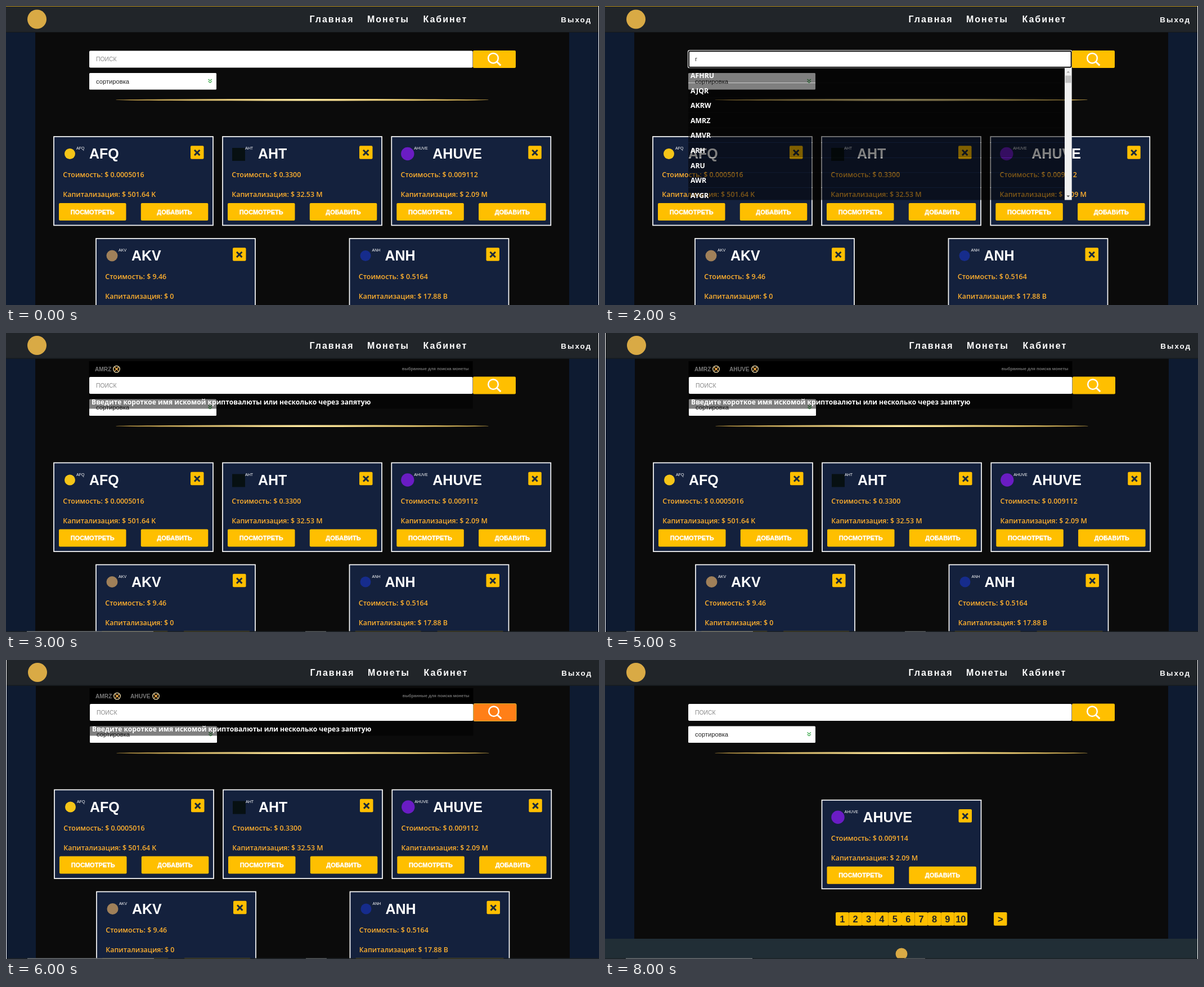
Animation of 1054 by 531 pixels, one loop 9000 ms. Source, as an HTML page:

```html
<!DOCTYPE html>
<html lang="ru">
<head>
<meta charset="utf-8">
<title>Монеты</title>
<style>
  html, body { margin: 0; width: 100%; height: 100%; overflow: hidden; background: #fff; }
  svg { display: block; width: 100%; height: 100%; }
  text { font-family: "Liberation Sans", Arial, sans-serif; white-space: pre; }
  .b { font-weight: 700; }
  .soft { font-family: "Open Sans", "Noto Sans", sans-serif; font-weight: 600; }
  .list { font-family: "Open Sans", "Noto Sans", sans-serif; font-weight: 700; }
  .mid { text-anchor: middle; }
  .end { text-anchor: end; }
</style>
</head>
<body>
<svg id="stage" viewBox="0 0 1054 531" preserveAspectRatio="none">
  <defs>
    <linearGradient id="gold">
      <stop offset="0" stop-color="#b08d3c"/>
      <stop offset=".5" stop-color="#ffeaa0"/>
      <stop offset="1" stop-color="#c9a548"/>
    </linearGradient>
  </defs>
  <g id="page"></g>
</svg>
<script>
const YELLOW = '#ffbf00', INK = '#212529', NAVY = '#14213d';

const rect = (x, y, w, h, fill, rx = 0, extra = '') =>
  `<rect x="${x}" y="${y}" width="${w}" height="${h}" rx="${rx}" fill="${fill}" ${extra}/>`;
const text = (x, y, size, fill, str, cls = '', extra = '') =>
  `<text x="${x}" y="${y}" font-size="${size}" fill="${fill}" class="${cls}" ${extra}>${str}</text>`;
const circle = (x, y, r, fill, extra = '') =>
  `<circle cx="${x}" cy="${y}" r="${r}" fill="${fill}" ${extra}/>`;
const line = (d, color, width) =>
  `<path d="${d}" fill="none" stroke="${color}" stroke-width="${width}"/>`;
const cross = (x, y, r, color, width) =>
  line(`M${x - r} ${y - r}l${2 * r} ${2 * r}m0 ${-2 * r}l${-2 * r} ${2 * r}`, color, width);
const group = (id, body, extra = '') => `<g id="${id}" ${extra}>${body}</g>`;

function button(x, y, label) {
  return rect(x, y, 119.5, 31, YELLOW, 2) +
    text(x + 59.7, y + 19.5, 11, '#fff', label, 'b mid', 'stroke="#fff" stroke-width=".35"');
}

function card(x, y, coin) {
  const icon = coin.square
    ? rect(17, 20, 23, 23, coin.color)
    : circle(28.5, 30.5, coin.r, coin.color);
  return `<g transform="translate(${x} ${y})">` +
    rect(0, 0, 283, 157.5, NAVY, 0, 'stroke="#fff" stroke-width="1.7"') +
    icon +
    text(40, 23, 7.1, '#fff', coin.name) +
    text(coin.name.length > 3 ? 73 : 63, 39, 25, '#fff', coin.name, 'b') +
    rect(243, 16.3, 23.5, 23.5, YELLOW, 2) + cross(254.7, 28.4, 4.7, '#1c2b3c', 3) +
    text(16.3, 72, 12.4, '#ffb02e', 'Стоимость: $ ' + coin.price, 'soft') +
    text(16.3, 107, 12.4, '#ffb02e', 'Капитализация: $ ' + coin.cap, 'soft') +
    button(9, 118, 'ПОСМОТРЕТЬ') + button(154.8, 118, 'ДОБАВИТЬ') + '</g>';
}

function dropRows(names) {
  const pitch = 26.6, top = 110, bottom = 344.5;
  return names.map((name, i) => {
    const y = top + i * pitch;
    return rect(148, y, 669, Math.min(pitch - .6, bottom - y), '#000', 0, 'opacity=".5"') +
      text(152, y + 18, 12.3, '#fff', name, 'list');
  }).join('') +
    rect(817, top, 12.7, bottom - top, '#f1f1f1') +
    rect(818, 123.5, 10.5, 13, '#c1c1c1') +
    '<path d="M820.5 118.5l2.8-3 2.8 3z" fill="#a3a3a3"/>' +
    '<path d="M820.5 336.5l2.8 3 2.8-3z" fill="#505050"/>';
}

function chip(x, iconX, name) {
  return text(x, 69, 10.2, '#777', name, 'b') +
    circle(iconX, 65.6, 5.8, 'none', 'stroke="#f3e3b5" stroke-width="1.3"') +
    cross(iconX, 65.6, 3.2, '#ffb347', 1.5);
}

const coins = [
  { name: 'AFQ', price: '0.0005016', cap: '501.64 K', color: '#f5c518', r: 9.5 },
  { name: 'AHT', price: '0.3300', cap: '32.53 M', color: '#071012', square: true },
  { name: 'AHUVE', price: '0.009112', cap: '2.09 M', color: '#6a1cc4', r: 11.7 },
  { name: 'AKV', price: '9.46', cap: '0', color: '#a08059', r: 10 },
  { name: 'ANH', price: '0.5164', cap: '17.88 B', color: '#162c8c', r: 9.5 }
];
const spots = [[85, 232], [385, 232], [685.3, 232], [160, 413], [610.5, 413]];

const header =
  rect(0, 0, 1053, 47, INK) + rect(0, 0, 1053, 1, '#b8901c') + rect(0, 46, 1053, 1, '#15181b') +
  circle(55, 23.5, 17, '#d9aa45') +
  [[539.5, 'Главная'], [642, 'Монеты'], [741.5, 'Кабинет']]
    .map(([x, s]) => text(x, 29, 16, '#fff', s, 'b', 'letter-spacing="2"')).join('') +
  text(986.3, 29, 13.4, '#fff', 'Выход', 'b', 'letter-spacing="2"');

const search =
  group('plain', rect(148, 79.5, 681.5, 30, '#fff', 2)) +
  group('focus', rect(147, 78.3, 683.5, 32.2, '#fff', 3) +
    rect(149, 80.2, 679.7, 28.6, '#fff', 2, 'stroke="#101010" stroke-width="2"')) +
  text(160, 98.4, 10.4, '#8a8a8a', '', '', 'id="query"') +
  rect(830, 79, 76, 31, YELLOW, 2, 'id="go"') +
  circle(866, 92.7, 8.8, 'none', 'stroke="#fff" stroke-width="2.5"') +
  line('M872.3 99l7 6.6', '#fff', 3);

const select =
  rect(148, 119, 226, 29.5, '#fff', 1.5) +
  text(160, 137.5, 11.2, '#222', 'сортировка') +
  line('M359.5 130l3.2 2.8 3.2-2.8m-6.4 3.5l3.2 2.8 3.2-2.8', '#3aa84a', 1.2) +
  '<ellipse cx="526.5" cy="166.7" rx="331.5" ry="1.8" fill="url(#gold)"/>';

const hint =
  rect(148, 110, 681.7, 26, '#000', 0, 'opacity=".5"') +
  text(152, 128, 12.1, '#fff',
    'Введите короткое имя искомой криптовалюты или несколько через запятую', 'list');

const picked =
  rect(147.5, 51.5, 682, 28, '#000') +
  chip(158, 196.5, 'AMRZ') + group('chip2', chip(220, 265.5, 'AHUVE')) +
  text(822.5, 67.8, 7.5, '#6e6e6e', 'выбранные для поиска монеты', 'b end');

const loader =
  rect(100, 177, 853, 356, '#111') +
  [224, 397.5].map(y => [132.7, 401.3, 670.3]
    .map(x => rect(x, y, 250, 148.5, '#282828', 4)).join('')).join('') +
  rect(479.3, 337, 14.8, 68, '#ffb347') +
  rect(518.8, 335, 14.6, 72, '#3db549') +
  rect(558, 330, 15, 82, '#adc6df');

const pageTab = (x, s) =>
  rect(x, 449.6, 23.5, 23.6, YELLOW, 2) + text(x + 11.7, 467.4, 16.4, INK, s, 'b mid');
const found =
  card(385.5, 250.3, { ...coins[2], price: '0.009114' }) +
  Array.from({ length: 10 }, (_, i) => pageTab(410 + i * 23.4, i + 1)).join('') +
  pageTab(691, '&gt;') +
  rect(0, 496.5, 1053, 36, '#212e36') + circle(527, 523.5, 10.5, '#d9aa45');

const taskbar =
  rect(0, 531, 1053, 3, '#1d2226') + rect(37, 531, 225, 3, '#6b6f72') + rect(532, 531, 37, 3, '#54585b');

const page = document.getElementById('page');
page.innerHTML =
  rect(0, 0, 1053, 533, '#0e1b31') + rect(52, 47, 949, 486, '#0b0b0b') + header +
  group('cards', coins.map((c, i) => card(...spots[i], c)).join('')) +
  group('loader', loader) + group('found', found) +
  group('select', select) + group('picked', picked) + search +
  group('hint', hint) +
  group('listR', dropRows(['AFHRU', 'AJQR', 'AKRW', 'AMRZ', 'AMVR', 'ARH', 'ARU', 'AWR', 'AYGR'])) +
  group('listA', dropRows(['AFQ', 'AFGU', 'AHT', 'AHUVE', 'AJKN', 'AKV', 'ANH', 'AOH', 'AQH'])) +
  taskbar;

const steps = [
  { dx: 0, dy: 0, show: 'cards' },
  { dx: 0, dy: -1.5, show: 'cards focus hint' },
  { dx: 0, dy: 0, show: 'cards focus listR', typed: 'r' },
  { dx: 0, dy: -1.5, show: 'cards picked hint' },
  { dx: 2, dy: -1.5, show: 'cards picked focus listA', typed: 'a' },
  { dx: 1, dy: -1.5, show: 'cards picked chip2 hint' },
  { dx: 1, dy: -1.5, show: 'cards picked chip2 hint', hot: true },
  { dx: 1, dy: 0, show: 'loader', hot: true, lift: 8 },
  { dx: 0, dy: -1.5, show: 'found' }
];
const layers = ['cards', 'loader', 'found', 'picked', 'chip2', 'plain', 'focus', 'hint', 'listR', 'listA'];
const el = id => document.getElementById(id);

function render(s) {
  const on = s.show.split(' ');
  if (!on.includes('focus')) on.push('plain');
  for (const id of layers) el(id).style.display = on.includes(id) ? '' : 'none';
  page.setAttribute('transform', `translate(${s.dx} ${s.dy})`);
  el('select').setAttribute('transform', `translate(0 ${-(s.lift || 0)})`);
  const query = el('query');
  query.textContent = s.typed || 'ПОИСК';
  query.setAttribute('fill', s.typed ? '#333' : '#8a8a8a');
  query.setAttribute('font-size', s.typed ? 11.2 : 10.4);
  const go = el('go');
  go.setAttribute('fill', s.hot ? '#ff7f17' : YELLOW);
  go.setAttribute('stroke', s.hot ? '#e0b030' : 'none');
}

let current = -1;
function tick() {
  const i = Math.floor(performance.now() % 9000 / 1000);
  if (i !== current) render(steps[current = i]);
  requestAnimationFrame(tick);
}
tick();
</script>
</body>
</html>
```
